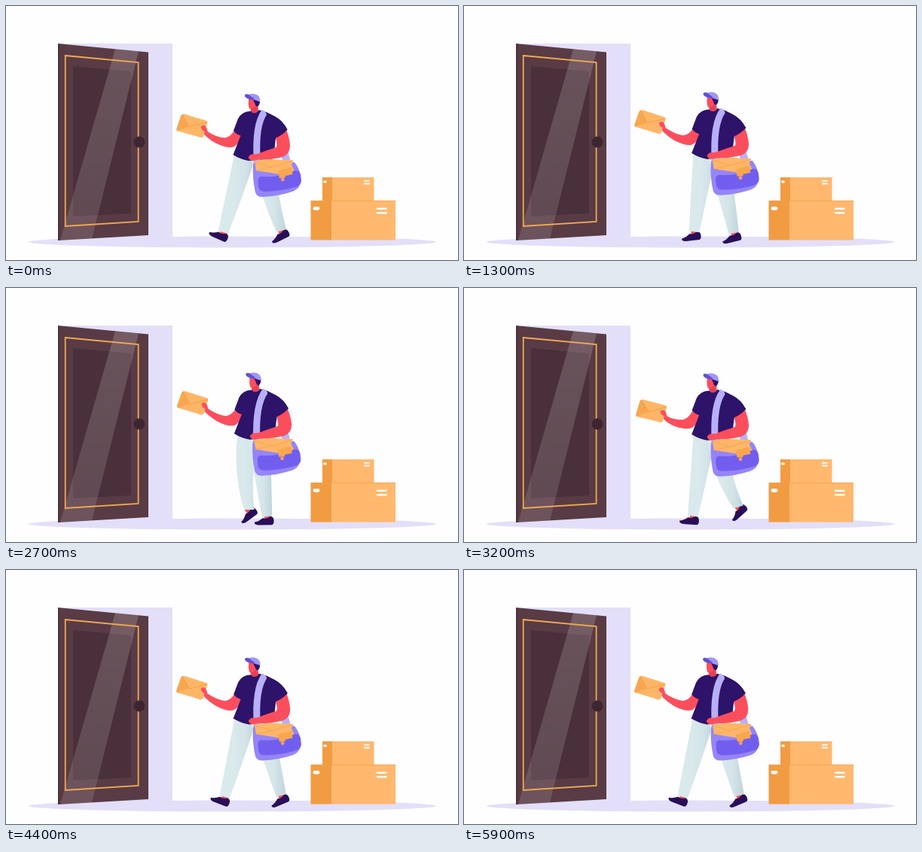
An HTML page that plays this animation: 600x338 px, repeating every 6000 ms.

```html
<!DOCTYPE html>
<html lang="en">
<head>
<meta charset="utf-8">
<title>Courier at the door</title>
<style>
html, body { margin: 0; width: 100%; height: 100%; overflow: hidden; background: #fefdff; }
svg { display: block; width: 100vw; height: 100vh; }
</style>
</head>
<body>
<svg viewBox="0 0 600 338" preserveAspectRatio="xMidYMid meet">
  <defs>
    <linearGradient id="pants">
      <stop offset=".4" stop-color="#d9e9ec"/>
      <stop offset=".7" stop-color="#d3e4e8"/>
      <stop offset="1" stop-color="#bfd4d9"/>
    </linearGradient>
    <linearGradient id="shine" x1="0" y1="0" x2="0" y2="1">
      <stop offset="0" stop-color="#fff" stop-opacity=".17"/>
      <stop offset="1" stop-color="#fff" stop-opacity=".12"/>
    </linearGradient>
  </defs>

  <ellipse cx="300.5" cy="314" rx="270.5" ry="7.5" fill="#e3dff8"/>

  <!-- door -->
  <path d="M69 50H221V313H69Z" fill="#e3dff8"/>
  <path d="M69 50L189 61.5V305L69 312Z" fill="#593b45"/>
  <path d="M69 50L71 50.2V311.9L69 312Z" fill="#4a303b"/>
  <path d="M89 80L166 87V276L89 280Z" fill="#4a303a"/>
  <path d="M145 57.3L176 60.3L114 309.4L72 311.8Z" fill="url(#shine)"/>
  <path d="M78.7 66L175.6 75V287L78.7 293Z" fill="none" stroke="#f0aa52" stroke-width="1.8"/>
  <circle cx="177" cy="181" r="7.5" fill="#3d2631"/>

  <!-- parcels -->
  <path d="M404.5 259H433V311.500H404.500Z" fill="#f19c42"/>
  <path d="M432 259H517V311.500H432Z" fill="#ffb86e"/>
  <path d="M420 228H434V259H420Z" fill="#f19c42"/>
  <path d="M433 228H488.500V259H433Z" fill="#ffb86e"/>
  <path d="M405 259.300H517" stroke="#f0a24c" stroke-width=".8"/>
  <g fill="none" stroke="#fff" stroke-linecap="round">
    <path d="M410 269.300H414" stroke-width="4.800"/>
    <path d="M422.500 234H424.500" stroke-width="2.800"/>
    <path d="M493 269.700H504.500M493 275.200H504.500" stroke-width="2.500"/>
    <path d="M476 232.700H482M476 236.500H482" stroke-width="1.800"/>
  </g>

  <!-- courier -->
  <g id="far"><path class="ankle" fill="#fb4e5d"/><path class="shoe" fill="#280f58"/><path class="leg" fill="url(#pants)"/></g>
  <g id="near"><path class="ankle" fill="#fb4e5d"/><path class="shoe" fill="#280f58"/><path class="leg" fill="url(#pants)"/></g>
  <path id="backStrap" fill="none" stroke="#b7b0f8" stroke-width="10"/>
  <path id="arm" fill="#fb4e5d"/>
  <g id="envelope">
    <path d="M237 143L266.500 152.500Q269 153.500 268.200 156L262.500 173Q261.500 175.500 259 174.800L228.500 165.500Q226.500 164.600 227.300 162.500L233.500 145Z" fill="#ffb566"/>
    <path d="M235 143.500L243.500 160L228.500 165.500Q226.500 164.600 227.300 162.500L233.500 145Z" fill="#f8a650"/>
    <path d="M235 143.500L243 158.500Q244.300 160.800 247 159.700L268 154.500" fill="none" stroke="#ef9f48" stroke-width="1"/>
    <path d="M259.500 160.500Q262 157.500 265.500 159.500L267.500 164L265.500 168L261 164.500Z" fill="#fb4e5d"/>
  </g>
  <g id="torso">
    <path d="M324 140Q313 140.500 308 150L302 166Q306 171 311.500 172.500L301.500 198Q311 204 322 206L355 203L358 176L373.500 164.500Q367 152 356 146.500L345 141L336 138.500Z" fill="#2d1369"/>
    <path d="M322 123L334 124L335 140Q329 145 325 140L324.500 137Q322.300 136.500 322.500 134.500L321.800 131Z" fill="#fb4e5d"/>
    <path d="M325 136.500Q329 137 332 133L334 140Q329 144 325.500 140.500Z" fill="#e63f55"/>
    <path d="M328 124.500L337 125Q337.500 131 334 134Q331 133.500 330.500 130Z" fill="#2d1369"/>
    <path d="M321.500 118Q330 115 335 119.500Q338 123 337 127.500L328.500 124.500Z" fill="#a096f7"/>
    <path d="M317 118.500Q318.500 116.500 322 117.800L329 123Q331 125.500 328 125Q321 124.300 318 121.500Q316.500 120 317 118.500Z" fill="#5f50d2"/>
  </g>
  <path id="strap" fill="none" stroke="#b7b0f8" stroke-width="9"/>
  <g id="bag">
    <path d="M331 207L383 208Q389 215 391 226L390 238Q388 244 380 247Q362 253 341 254Q333 254.500 331 248Q327 230 328 212Q328.500 207 331 207Z" fill="#9585f8"/>
    <path d="M330 206.500L350 204L381.500 205.500L379 211L383 220L364 224L332 219Z" fill="#ffb668"/>
    <path d="M330 207L353 214.500L381 206M353 214.500L332 219" fill="none" stroke="#f6a750" stroke-width="1"/>
    <path d="M340 227Q362 229 383 219Q389 217.500 391 224L392 232Q392 238 386 240.500Q365 247 343 247Q336 247 335 240L334.500 232Q335 226.500 340 227Z" fill="#725eee"/>
    <path d="M361 219.500L379 214.500L380.500 224L371 226L370.500 228.500L363 229Z" fill="#f8a74f"/>
    <circle cx="367.300" cy="231" r="2.400" fill="#f79a6a"/>
  </g>
  <path id="bagArm" fill="#fb4e5d"/>
  <path id="sleeve" d="M345 141L356 146.500Q367 152 373.500 164.500Q367 172 357 176L350 163Z" fill="#2d1369"/>
</svg>
<script>
const STEP = 100, LOOP = 6000, CYCLE = 1500, TAU = Math.PI * 2;
const $ = id => document.getElementById(id);
const wave = (p, shift = 0) => Math.cos(TAU * (p - shift));

// gait: phase, ankle x, ankle y, foot angle
const gait = [
  [0, 366, 301, -25], [.05, 364, 298, -30], [.1, 365, 294, -39], [.2, 362, 293, -42],
  [.3, 336, 297, -35], [.335, 327, 301, -20], [.433, 303, 304, 22],
  [.5, 301, 303, 25], [.533, 303, 303, 24], [.6, 312, 305, 9],
  [.7, 327, 306, 0], [.8, 347, 306, 0], [.84, 355, 305, -8], [.933, 366, 302, -22]
];

function key(i) {
  const n = gait.length, turn = Math.floor(i / n);
  const k = gait[i - turn * n];
  return [k[0] + turn, k[1], k[2], k[3]];
}

// periodic Hermite curve through the gait keys
function foot(phase) {
  const p = phase - Math.floor(phase);
  let i = gait.length - 1;
  while (gait[i][0] > p) i--;
  const [a, b, c, d] = [i - 1, i, i + 1, i + 2].map(key);
  const h = c[0] - b[0], s = (p - b[0]) / h, s2 = s * s, s3 = s2 * s;
  return [1, 2, 3].map(j => {
    const m0 = h * (c[j] - a[j]) / (c[0] - a[0]);
    const m1 = h * (d[j] - b[j]) / (d[0] - b[0]);
    return (2 * s3 - 3 * s2 + 1) * b[j] + (s3 - 2 * s2 + s) * m0 +
           (3 * s2 - 2 * s3) * c[j] + (s3 - s2) * m1;
  });
}

const pt = (x, y) => x.toFixed(2) + ' ' + y.toFixed(2);
const move = (id, x, y) => $(id).setAttribute('transform', `translate(${pt(x, y)})`);
const shape = (id, d) => $(id).setAttribute('d', d);

for (const el of document.querySelectorAll('.ankle')) el.setAttribute('d', 'M-4 -5H5V2H-4Z');
for (const el of document.querySelectorAll('.shoe')) {
  el.setAttribute('d', 'M-6 0Q-2 2 4 -2Q8 -2 8.5 3Q9 8.5 6 9.2L-12 9.5Q-18 9 -17 5.5Q-12 5 -6 0Z');
}

function drawLeg(id, hx, hy, phase, shift) {
  const [fx, fy, turn] = foot(phase);
  const ax = fx + shift, ay = fy;
  const dx = ax - hx, dy = ay - hy, len = Math.hypot(dx, dy);
  const ux = dx / len, uy = dy / len, nx = -uy, ny = ux;
  const bend = 2 * Math.max(0, 103 - len);
  const cx = (hx + ax) / 2 + nx * bend, cy = (hy + ay) / 2 + ny * bend;
  const ex = ax - 2 * ux, ey = ay - 2 * uy;
  const at = (x, y, w) => pt(x + nx * w, y + ny * w);
  const [ankle, shoe, leg] = $(id).children;
  leg.setAttribute('d',
    `M${pt(hx - 15, hy - 6)}L${pt(hx - 15, hy)}Q${at(cx, cy, 11)} ${at(ex, ey, 7)}` +
    `L${at(ex, ey, -6.5)}Q${at(cx, cy, -11)} ${pt(hx + 14, hy)}L${pt(hx + 14, hy - 6)}Z`);
  const pose = `translate(${pt(ax, ay)}) rotate(${turn.toFixed(2)})`;
  ankle.setAttribute('transform', pose);
  shoe.setAttribute('transform', pose);
}

function draw(t) {
  const p = (t % CYCLE) / CYCLE;
  const lift = -2.5 + 2.5 * wave(2 * p, -.03);
  const sway = 2 - 2 * wave(p);
  const swing = 3.2 * (1 - wave(p));
  const bagX = wave(p) - 1;

  drawLeg('far', 324 - 7 * wave(p), 203 + lift, p + .5, -13);
  drawLeg('near', 334 + 6 * wave(p), 203 + lift, p, 0);
  move('torso', sway, lift);
  move('sleeve', sway, lift);
  move('bag', bagX, lift);

  // point mixed between two moving frames
  const mix = (ax, ay, bx, by) => (x, y, k) => pt(x + ax + (bx - ax) * k, y + ay + (by - ay) * k);

  const ex = 2 - 3 * wave(p, -.07), ey = .8 + 6 * wave(p, .3) + 1.2 * wave(2 * p);
  const tilt = -3 + 3 * wave(p, .87);
  $('envelope').setAttribute('transform', `translate(${pt(ex, ey)}) rotate(${tilt.toFixed(2)} 264 165)`);
  const a = mix(sway, lift, ex, ey);
  shape('arm', `M${a(304, 164, 0)}L${a(313, 171, 0)}Q${a(311, 183, .1)} ${a(302, 187.5, .2)}` +
    `Q${a(294, 190, .4)} ${a(279, 182.5, .7)}Q${a(268, 176, 1)} ${a(263, 169.5, 1)}` +
    `L${a(260, 163, 1)}L${a(266, 160, 1)}L${a(268.5, 167, 1)}` +
    `Q${a(280, 174.5, .7)} ${a(291, 175.5, .4)}Q${a(299, 174, .2)} ${a(304, 164, 0)}Z`);

  const b = mix(sway, lift, swing, lift);
  shape('bagArm', `M${b(356, 171, 0)}L${b(371, 162, 0)}Q${b(376.5, 175, .7)} ${b(377, 186, 1)}` +
    `Q${b(377, 197, 1)} ${b(367, 201, 1)}Q${b(350, 205, 1)} ${b(335, 204.5, 1)}` +
    `L${b(328, 206, 1)}Q${b(323, 206, 1)} ${b(321.5, 201, 1)}L${b(325, 197.5, 1)}` +
    `L${b(333, 197, 1)}Q${b(346, 192, 1)} ${b(359, 188, 1)}Q${b(361, 181, .6)} ${b(356, 171, 0)}Z`);

  const s = mix(sway, lift, bagX, lift);
  shape('strap', `M${s(343.5, 140.5, 0)}Q${s(330, 158, .3)} ${s(333.5, 208, 1)}`);
  shape('backStrap', `M${s(350, 148, 0)}Q${s(364, 172, .4)} ${s(373, 208, 1)}`);
}

const start = performance.now();
function tick(now) {
  const t = Math.max(0, now - start) % LOOP;
  draw(Math.floor(t / STEP) * STEP);
  requestAnimationFrame(tick);
}
draw(0);
requestAnimationFrame(tick);
</script>
</body>
</html>
```
